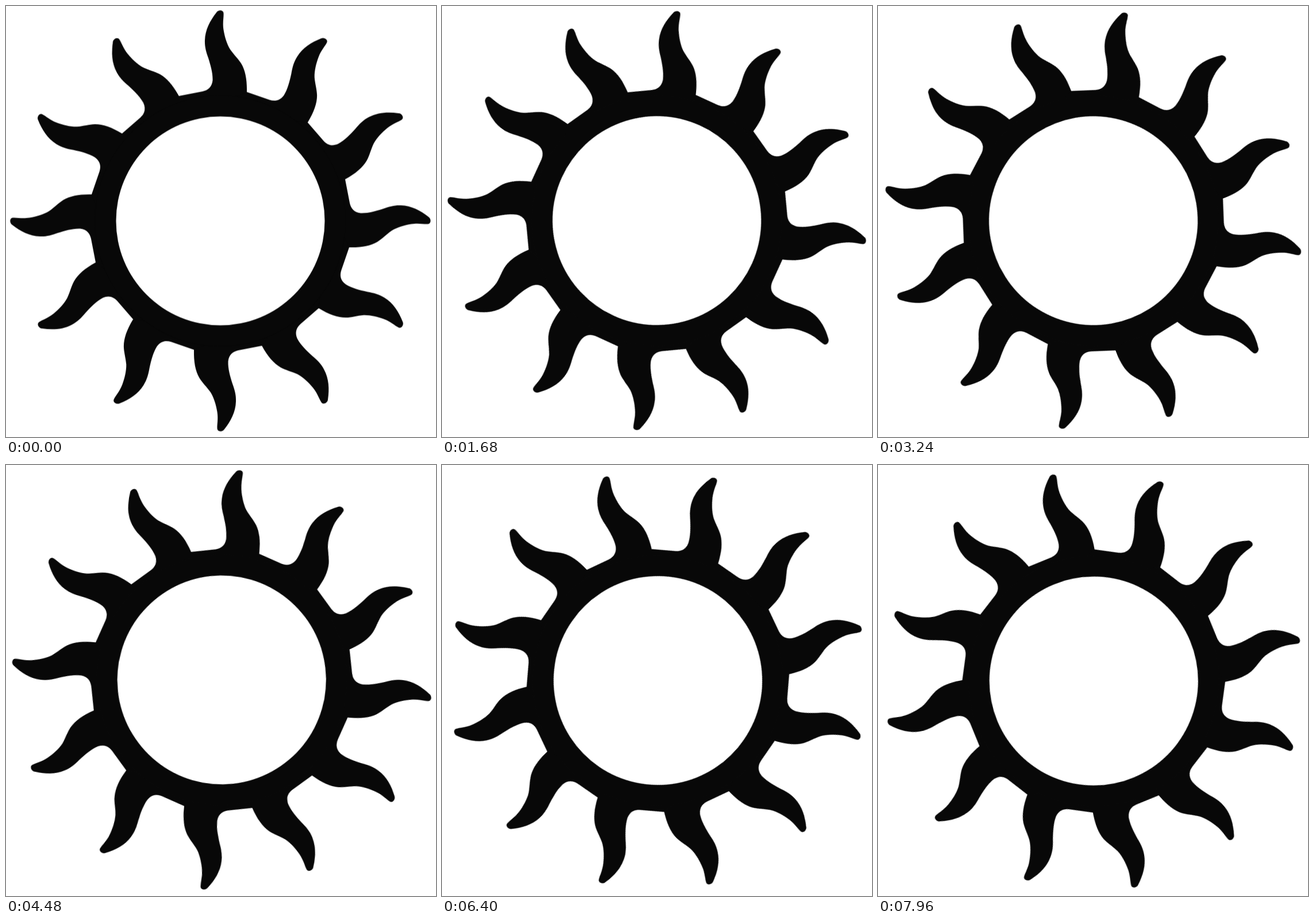
Write an HTML page without scripts that moves like this. It is 748 by 749 pixels and loops after 8000 ms.

```html
<!DOCTYPE html>
<html lang="en">
<head>
<meta charset="utf-8">
<title>Turning sun</title>
<style>
  html, body { margin: 0; width: 100%; height: 100%; overflow: hidden; background: #fff; }
  svg { display: block; width: 100%; height: 100%; }
  /* The sun sits slightly off the pivot, so it wobbles as it turns. */
  .spin { transform-origin: 374px 374.5px; animation: spin 8s steps(200) infinite; }
  @keyframes spin { to { transform: rotate(169.6deg); } }
</style>
</head>
<body>
<svg viewBox="0 0 748 749">
  <defs>
    <path id="ray" d="M-85-200 L-72.2-217 L-31-225
      C-22-227 -15-232 -13.5-244
      C-13-257 -17-270 -21-283
      C-25-294 -27.5-303 -27-314
      C-26.5-332 -18-348 -7-362
      C-4-367 5-367 5.5-361
      C6-353 3.5-345 5.5-332
      C7.5-320 11-308 17-298
      C24-288 31-282 36.5-273
      C43.5-261 46.5-245 46-224
      L40-190Z"/>
    <g id="trio">
      <use href="#ray"/>
      <use href="#ray" transform="rotate(30)"/>
      <use href="#ray" transform="rotate(60)"/>
    </g>
  </defs>
  <g class="spin">
    <g transform="translate(372.9 373.4)" fill="#080808">
      <use href="#trio"/>
      <use href="#trio" transform="rotate(90)"/>
      <use href="#trio" transform="rotate(180)"/>
      <use href="#trio" transform="rotate(270)"/>
      <circle r="218"/>
      <circle r="181.5" fill="#fff"/>
    </g>
  </g>
</svg>
</body>
</html>
```
